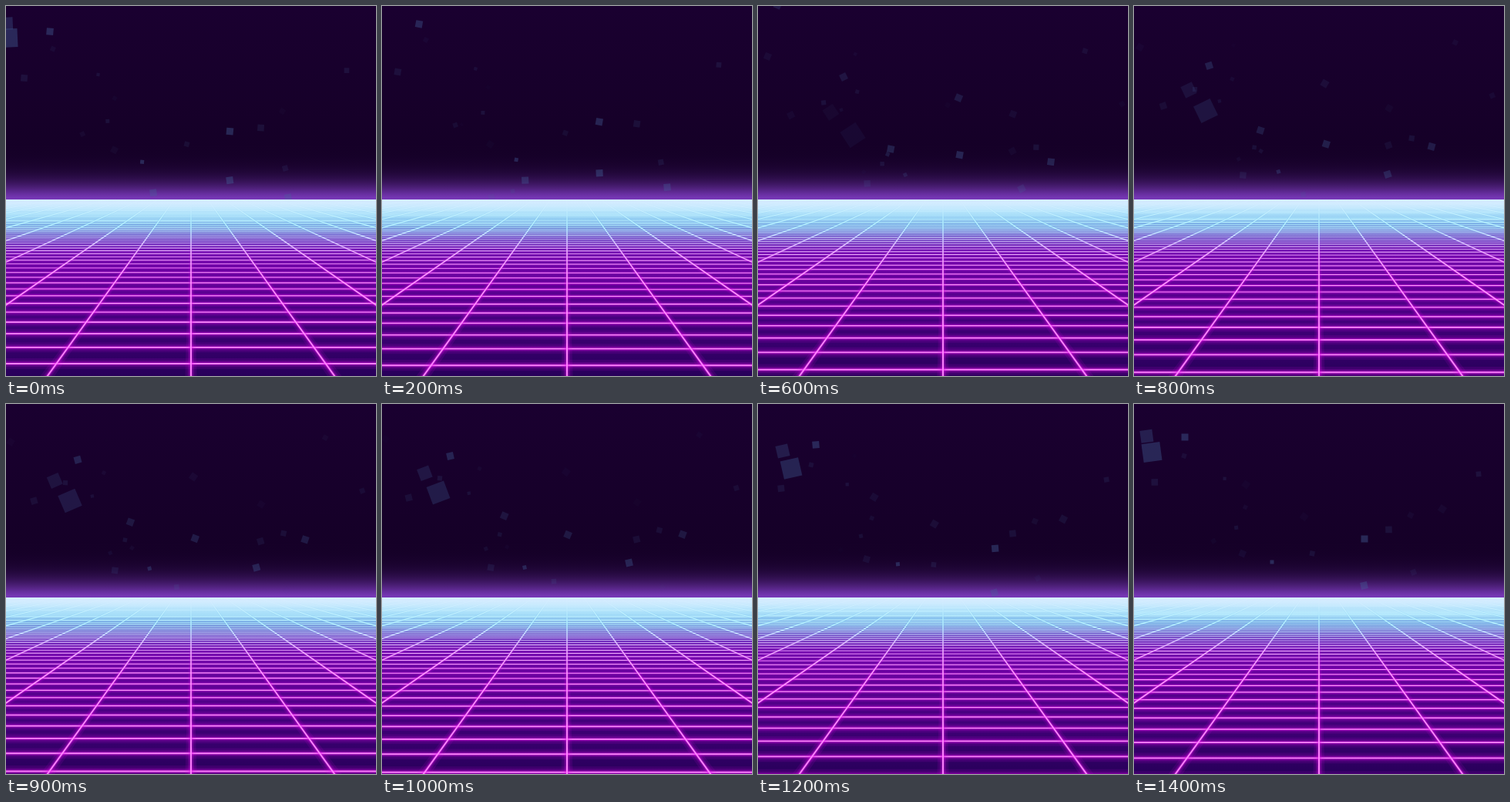
Animation of 480 by 480 pixels, one loop 1500 ms. Source, as an HTML page with a canvas:

```html
<!DOCTYPE html>
<html>
<head>
<meta charset="utf-8">
<style>
html, body { margin: 0; width: 100%; height: 100%; overflow: hidden; background: #17002b; }
canvas { display: block; }
</style>
</head>
<body>
<canvas id="stage" width="480" height="480"></canvas>
<script>
const ctx = document.getElementById('stage').getContext('2d');
const SIZE = 480, MID = 240, HORIZON = 251, VANISH = 221, DEPTH = SIZE - VANISH;
const STEPS = 15, TICKS = 19, HALF_LIFE = 15;

let seed = 7;
function random(min, max) {
  seed = (seed * 16807) % 2147483647;
  return min + (max - min) * seed / 2147483647;
}

// A square passes (x, y) at its peak tick, when it is brightest and upright
const square = (peak, x, y, vx, vy, side, opacity = .4) =>
  ({ peak, x, y, vx, vy, side, opacity });

const squares = [
  square(20, -7, 31, -10, -10.5, 24),
  square(20, -7, 13, -7.8, -9.6, 16, .32),
  square(-2, 66, 43, -4.5, -4.9, 9),
  square(-2, 299, 175, -4.3, -6.2, 9),
  square(3, 278, 212, -4.1, -4.7, 9),
  square(3, 183, 218, -2.7, -8.1, 9, .34),
  square(4, 374, 222, 2, -6.6, 9, .34),
  square(-2, 179, 205, -1.2, -1.4, 5)
];
for (let i = 0; i < 10; i++) {
  squares.push(square(random(0, TICKS), random(0, SIZE), random(20, 240),
    random(-4, 3), random(-8, -2), random(4, 9), .16));
}

function gradient(...stops) {
  const g = ctx.createLinearGradient(0, 0, 0, SIZE);
  for (const [y, color] of stops) g.addColorStop(y / SIZE, color);
  return g;
}

// A band of light that is strongest at the horizon
function horizonLight(rgb, width, power, direction) {
  const reach = 80 * direction;
  const g = ctx.createLinearGradient(0, HORIZON, 0, HORIZON + reach);
  for (let i = 0; i <= 20; i++) {
    const alpha = Math.exp(-Math.pow(80 * i / 20 / width, power)) * (1 - (i / 20) ** 4);
    g.addColorStop(i / 20, `rgba(${rgb},${alpha.toFixed(4)})`);
  }
  return g;
}

const sky = gradient([0, '#1a0030'], [190, '#150027']);
const ground = gradient([320, '#58009a'], [400, '#46007f'], [480, '#28005a']);
const dusk = horizonLight('120,56,184', 22, 1.5, -1);
const cyanHaze = horizonLight('125,210,240', 38, 2, 1);
const whiteHaze = horizonLight('214,236,255', 17, 2, 1);
const core = gradient([288, '#c0f4ff'], [315, '#ecc0ff'], [345, '#ffa4ff'], [480, '#ff84ff']);
const glow = gradient([285, '#58b8f0'], [322, '#bc20e4'], [360, '#e400ec']);

function drawSquare({ peak, x, y, vx, vy, side, opacity }, tick) {
  const age = tick - peak;
  if (Math.abs(age) >= HALF_LIFE) return;
  ctx.save();
  ctx.translate(x + vx * age, y + vy * age);
  ctx.rotate(.045 * age);
  ctx.globalAlpha = opacity * Math.cos(Math.PI / 2 * age / HALF_LIFE);
  ctx.fillStyle = '#44649c';
  ctx.fillRect(-side / 2, -side / 2, side, side);
  ctx.restore();
}

function fillPath(style, alpha, trace) {
  ctx.fillStyle = style;
  ctx.globalAlpha = alpha;
  ctx.beginPath();
  trace();
  ctx.fill();
}

// Calls draw(style, alpha, width) from the widest glow to the bright core
function neon(scale, thinnest, draw) {
  draw(glow, .1, 15 * scale);
  draw(glow, .14, 9 * scale);
  draw(glow, .3, 5 * scale);
  draw(core, .95, Math.max(thinnest, 2.1 * scale));
}

function drawRow(depth) {
  neon(depth / DEPTH, .9, (style, alpha, width) =>
    fillPath(style, alpha, () => ctx.rect(0, VANISH + depth - width / 2, SIZE, width)));
}

// Tapers towards the vanishing point
function drawRay(slope) {
  const far = MID + slope * (HORIZON - VANISH), near = MID + slope * DEPTH;
  const stretch = Math.hypot(1, slope);
  neon(1, 2.1, (style, alpha, width) => fillPath(style, alpha, () => {
    const w = width * stretch / 2, tip = Math.max(.6 * stretch, w * .12);
    ctx.moveTo(far - tip, HORIZON);
    ctx.lineTo(far + tip, HORIZON);
    ctx.lineTo(near + w, SIZE);
    ctx.lineTo(near - w, SIZE);
  }));
}

function fillGround(style) {
  ctx.globalAlpha = 1;
  ctx.fillStyle = style;
  ctx.fillRect(0, HORIZON, SIZE, SIZE - HORIZON);
}

function drawGround(tick) {
  ctx.save();
  ctx.beginPath();
  ctx.rect(0, HORIZON, SIZE, SIZE - HORIZON);
  ctx.clip();
  fillGround(ground);
  fillGround(cyanHaze);
  const phase = .537 - .047 * tick;
  for (let n = 75; n >= 9; n--) drawRow(2560 / (n + phase));
  for (let i = -12; i <= 12; i++) drawRay(.719 * i);
  fillGround(whiteHaze);
  ctx.restore();
}

function draw(time) {
  const step = Math.floor(time / 100) % STEPS;
  const tick = Math.floor(step * TICKS / STEPS);
  for (const layer of [sky, dusk]) {
    ctx.fillStyle = layer;
    ctx.fillRect(0, 0, SIZE, HORIZON);
  }
  for (const s of squares)
    for (const turn of [-TICKS, 0, TICKS]) drawSquare(s, tick + turn);
  drawGround(tick);
}

const start = performance.now();
function loop() {
  draw(performance.now() - start);
  requestAnimationFrame(loop);
}
loop();
</script>
</body>
</html>
```
